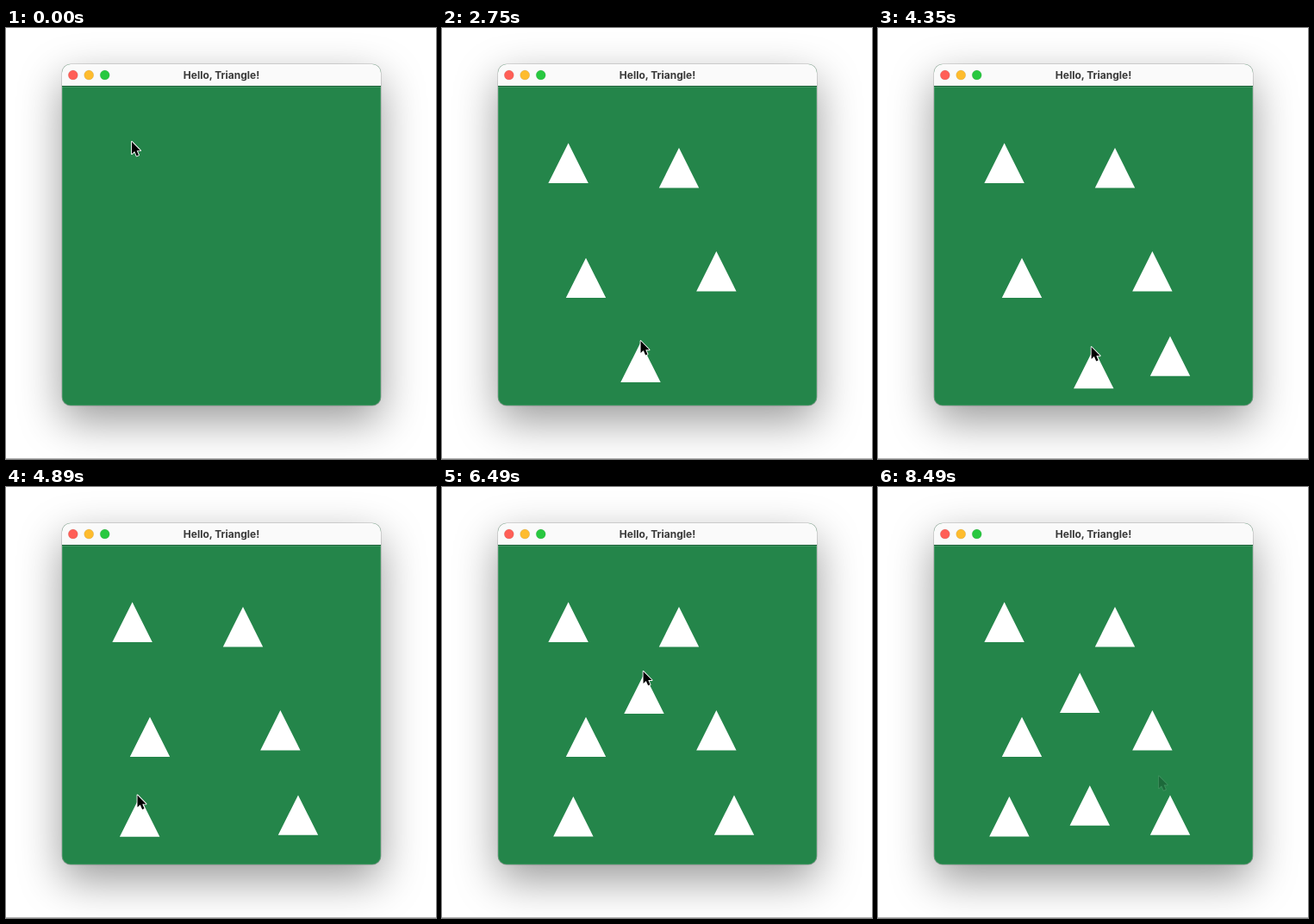
An HTML page for the animation above (8.59 s loop, 499 by 500 pixels).

```html
<!DOCTYPE html>
<html lang="en">
<head>
<meta charset="utf-8">
<title>Hello, Triangle!</title>
<style>
  html, body { margin: 0; width: 100%; height: 100%; overflow: hidden; background: #fff; }
  .stage { position: relative; width: 499px; height: 500px; overflow: hidden; }
  .window {
    position: absolute; left: 65px; top: 41.5px; width: 370px; height: 396px;
    border-radius: 10px; overflow: hidden; background: #24854a;
    box-shadow: 0 0 0 .5px rgba(0, 0, 0, .25), 0 18px 50px rgba(0, 0, 0, .4);
  }
  .window::after {
    content: ""; position: absolute; inset: 26.5px 0 0; border-radius: 0 0 10px 10px;
    box-shadow: inset 0 0 0 .6px rgba(255, 255, 255, .25);
  }
  .bar {
    height: 25.5px; background: #fafafa; border-bottom: 1px solid #195f36;
    font: 700 12px/25.5px Inter, Roboto, sans-serif; color: #393939; text-align: center;
  }
  .floor { position: absolute; left: 0; bottom: 0; width: 100%; height: 1px; background: #b4b4b4; }
  svg { position: absolute; inset: 0; }
</style>
</head>
<body>
<div class="stage">
  <div class="window"><div class="bar">Hello, Triangle!</div></div>
  <div class="floor"></div>
  <svg width="499" height="500">
    <g stroke="#000" stroke-opacity=".14" stroke-width=".6">
      <circle cx="77.8" cy="54.6" r="5.5" fill="#ff5f57"/>
      <circle cx="96.2" cy="54.6" r="5.5" fill="#febc2e"/>
      <circle cx="114.7" cy="54.6" r="5.5" fill="#28c840"/>
    </g>
    <g id="triangles" fill="#fff"></g>
    <path id="pointer" d="M0 0V14L3.2 11L5.6 16.4L8 15.4L5.7 10.2H10Z"
          stroke="#fff" stroke-width="1.8" stroke-linejoin="round" paint-order="stroke"/>
  </svg>
</div>
<script>
const LOOP = 8590;
const smooth = u => u * u * (3 - 2 * u);
const easeOut = u => 1 - (1 - u) ** 1.5;

// Pointer moves: times in ms, number of steps, end point, optional curve control point
const moves = [
  { start: 0, end: 0, steps: 1, to: [146.6, 133.6] },
  { start: 350, end: 590, steps: 7, to: [275, 139] },
  { start: 920, end: 1250, steps: 10, to: [318.4, 259] },
  { start: 1390, end: 1790, steps: 11, to: [167, 266.7] },
  { start: 2150, end: 2450, steps: 10, to: [230.5, 364.7] },
  { start: 2750, end: 3450, steps: 22, to: [339, 357.4] },
  { start: 3650, end: 4050, steps: 13, to: [251, 372], via: [300, 322] },
  { start: 4290, end: 4918, steps: 20, to: [152.4, 359] },
  { start: 4951, end: 5050, steps: 4, to: [166, 357] },
  { start: 5250, end: 5520, steps: 7, to: [244, 337] },
  { start: 5790, end: 6490, steps: 22, to: [234.2, 215.5], via: [250.4, 276], ease: easeOut },
  { start: 6650, end: 6650, steps: 1, to: [235, 216] },
  { start: 6850, end: 7190, steps: 11, to: [245, 296] },
  { start: 7420, end: 7980, steps: 16, to: [245.8, 346.3] },
  { start: 8016, end: 8090, steps: 3, to: [251.5, 346.5] },
  { start: 8450, end: 8450, steps: 1, to: [326.5, 337] }
];
moves.forEach((m, i) => { m.from = i ? moves[i - 1].to : m.to; });

const triangles = [
  { born: 90, at: moves[0].to },
  { born: 590, at: moves[1].to },
  { born: 1250, at: moves[2].to },
  { born: 1790, at: moves[3].to },
  { born: 2450, drag: moves[5] },
  { born: 4290, drag: moves[7] },
  { born: 5520, drag: moves[10] },
  { born: 7190, drag: moves[13] }
];

const layer = document.getElementById('triangles');
const pointer = document.getElementById('pointer');
for (const tri of triangles) {
  tri.node = document.createElementNS('http://www.w3.org/2000/svg', 'path');
  tri.node.setAttribute('d', 'M0 0L23.2 46.4H-23.2Z');
  layer.append(tri.node);
}

function along(move, t, lag = 0) {
  const { start, end, steps, from, to, via, ease = smooth } = move;
  const gap = (end - start) / (steps - 1) || 1;
  const step = Math.floor((t - start) / gap + 1e-6) + 1 - lag;
  const s = ease(Math.min(1, Math.max(0, step / steps)));
  return from.map((a, i) => {
    const control = via ? via[i] : (a + to[i]) / 2;
    return (1 - s) ** 2 * a + 2 * s * (1 - s) * control + s * s * to[i];
  });
}

const put = (node, [x, y]) => node.setAttribute('transform', `translate(${x} ${y})`);

function draw(now) {
  const t = now % LOOP;
  for (const { node, born, at, drag } of triangles) {
    node.style.display = t < born ? 'none' : '';
    put(node, at || along(drag, t, 1));
  }
  const [x, y] = along(moves.findLast(m => m.start <= t), t);
  put(pointer, [x - .6, y - 1.6]);
  pointer.style.opacity = t < 8450 ? 1 : t < 8490 ? .5 : .2;
  pointer.style.stroke = t < 8490 ? '#fff' : '#9ab8a4';
}

const origin = performance.now();
function tick() {
  draw(performance.now() - origin);
  requestAnimationFrame(tick);
}
tick();
</script>
</body>
</html>
```
